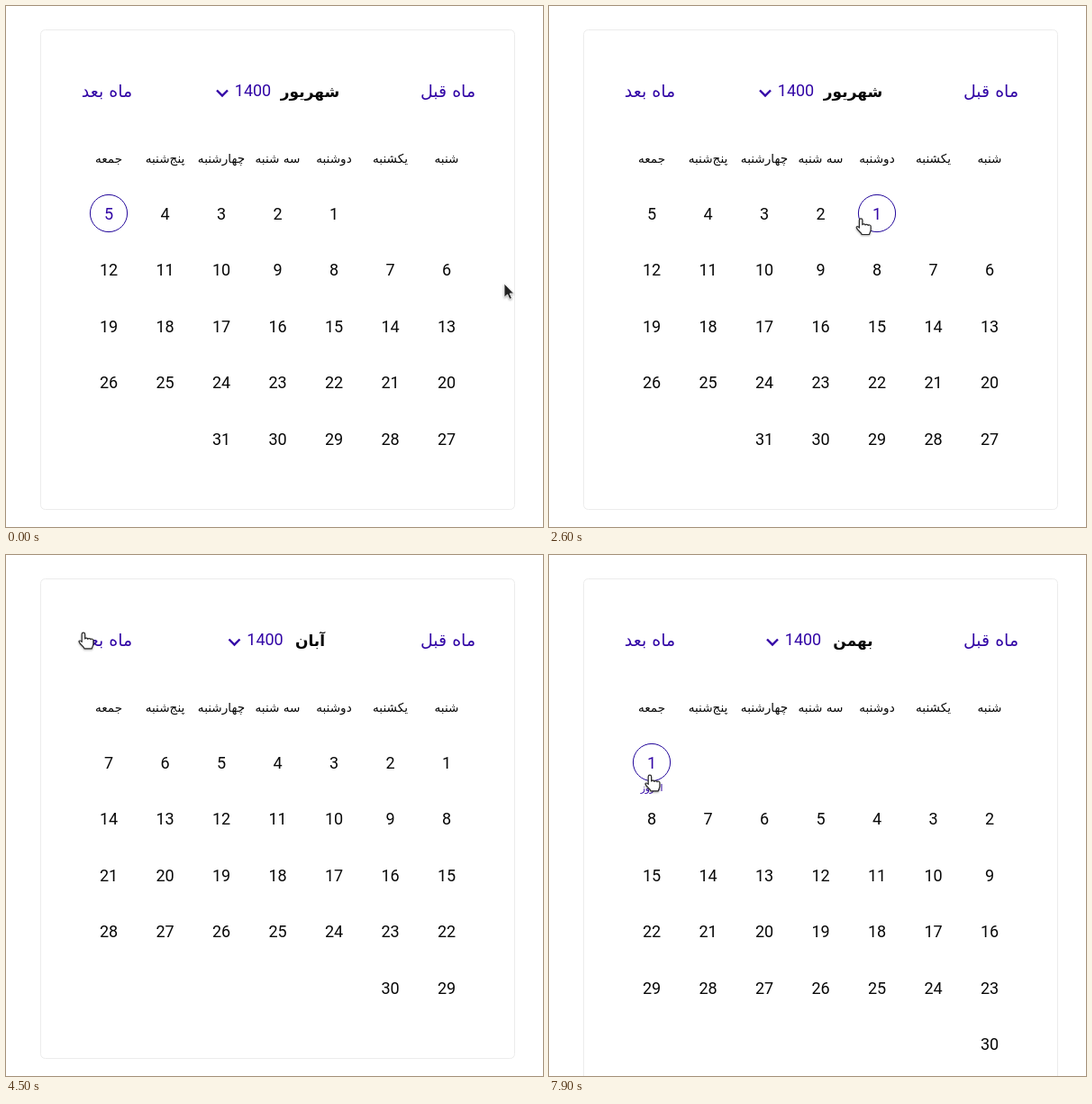
An HTML page for the animation above (8000 ms loop, 596 by 578 pixels).

```html
<!DOCTYPE html>
<html lang="fa">
<head>
<meta charset="utf-8">
<title>تقویم</title>
<style>
  html, body { margin: 0; width: 100%; height: 100%; overflow: hidden; background: #fff; }
  svg { display: block; width: 596px; height: 578px; }
  text { text-anchor: middle; fill: #080808; font: 18px Roboto, sans-serif; }
  .fa { font-family: "DejaVu Sans", sans-serif; direction: rtl; }
  .link { font-size: 19px; }
  .month { font-size: 17px; font-weight: bold; }
  .weekday { font-size: 13.6px; }
  .today { font-size: 10.6px; }
  .accent { fill: #3206a6; }
</style>
</head>
<body>
<svg viewBox="0 0 596 578">
  <rect id="card" x="38.5" y="26.5" width="526" rx="5" fill="#fff" stroke="#ececec"/>
  <text class="fa link accent" x="490.5" y="101">ماه قبل</text>
  <text class="fa link accent" x="112" y="101">ماه بعد</text>
  <text id="month" class="fa month" x="337.5" y="101"></text>
  <g id="year">
    <text class="accent" x="20" y="100">1400</text>
    <path d="M-20 93.5l6 6 6-6" fill="none" stroke="#3206a6" stroke-width="2.4"/>
  </g>
  <g id="weekdays"></g>
  <g id="days"></g>
  <g id="cursor" style="filter: drop-shadow(0 1px 1px #0005)">
    <path id="arrow" d="M0 0V15.2L3.6 12 6 17.3 8.4 16.2 6.1 11H10.6Z" fill="#222" stroke="#fff" stroke-width=".8"/>
    <path id="hand" d="M-1.8 9.5V.9a1.7 1.7 0 0 1 3.4 0V6c.3-1.1 3-1.1 3.2.3 .4-1 3-.9 3.2.4 .5-.9 2.9-.5 2.9.9V11.5c0 2.5-1.5 3.2-1.6 5.3H1C.5 14.5-3.8 12.5-4.9 9.3c-.5-1.7 1.6-1.9 3.1.2Z"
      fill="#fff" stroke="#2a2a2a" stroke-width="1.2" stroke-linejoin="round"/>
  </g>
</svg>
<script>
const LOOP = 8000, STEP = 100, PITCH = 62.5, FADE = 300;
const $ = id => document.getElementById(id);
const weekdays = ["شنبه", "یکشنبه", "دوشنبه", "سه شنبه", "چهارشنبه", "پنج\u200cشنبه", "جمعه"];

const months = [
  { at: 0, name: "شهریور", first: 2, length: 31, yearX: 254 },
  { at: 3800, name: "مهر", first: 5, length: 30, yearX: 267 },
  { at: 4300, name: "آبان", first: 0, length: 30, yearX: 267.5 },
  { at: 4900, name: "آذر", first: 2, length: 30, yearX: 272 },
  { at: 5400, name: "دی", first: 4, length: 30, yearX: 271.5 },
  { at: 5900, name: "بهمن", first: 6, length: 30, yearX: 262, today: 1 }
];

const picks = [
  { at: -1000, month: "شهریور", day: 5 },
  { at: 1625, month: "شهریور", day: 1 },
  { at: 2825, month: "شهریور", day: 2 },
  { at: 7525, month: "بهمن", day: 1 }
];

// Pointer stops: time, x, y
const stops = [
  [300, 553, 308], [1200, 364, 229], [1800, 364, 229], [2300, 361, 238],
  [2500, 361, 238], [2800, 304, 233], [2900, 302, 231], [3200, 201, 129],
  [3300, 201, 129], [3400, 60, 62], [3700, 86, 87], [6400, 86, 87],
  [7000, 94, 206], [7300, 106, 225], [7600, 112, 245]
];

const clamp = v => Math.max(0, Math.min(1, v));
const smooth = v => v * v * (3 - 2 * v);
const latest = (list, t) => list.filter(item => item.at <= t).pop();
const colX = col => 489 - PITCH * col;
const rowY = row => Math.floor(230 + PITCH * row);

function pointerAt(t) {
  const next = stops.findIndex(s => s[0] > t);
  if (next < 0) return stops[stops.length - 1].slice(1);
  if (next === 0) return stops[0].slice(1);
  const a = stops[next - 1], b = stops[next];
  const k = smooth((t - a[0]) / (b[0] - a[0]));
  return [a[1] + (b[1] - a[1]) * k, a[2] + (b[2] - a[2]) * k];
}

// Ring strength of a day: the newest pick fades in, the one before fades out
function ringOf(month, day, t) {
  const made = picks.filter(p => p.at <= t);
  const [before, now] = [made[made.length - 2], made[made.length - 1]];
  const k = clamp((t - now.at) / FADE);
  const matches = p => p && p.month === month.name && p.day === day;
  return { picked: matches(now), ring: matches(now) ? k : matches(before) ? 1 - k : 0 };
}

function render(t) {
  const month = latest(months, t);
  const [px, py] = pointerAt(t);
  const rows = Math.ceil((month.first + month.length) / 7);
  let overLink = px > 78 && px < 146 && py > 80 && py < 112;
  let html = "";

  for (let day = 1; day <= month.length; day++) {
    const slot = month.first + day - 1;
    const x = colX(slot % 7), y = rowY(Math.floor(slot / 7));
    const { picked, ring } = ringOf(month, day, t);
    const dx = px - x, dy = py - y;
    if (Math.abs(dx) < 31 && Math.abs(dy) < 31) overLink = true;
    if (Math.hypot(dx, dy) < 21) {
      html += `<circle cx="${x}" cy="${y}" r="21" fill="#f5f5f7" opacity="${picked ? 1 - ring : 1}"/>`;
    }
    if (ring > 0) {
      html += `<circle cx="${x}" cy="${y}" r="20.6" fill="none" stroke="#22069a" opacity="${ring}"/>`;
    }
    const tone = picked ? " accent" : "";
    html += `<text class="${tone}" x="${x}" y="${y + 7}">${day}</text>`;
    if (day === month.today) {
      html += `<text class="fa today${tone}" x="${x}" y="${y + 25 + 7 * ring}">امروز</text>`;
    }
  }

  $("days").innerHTML = html;
  $("card").setAttribute("height", 532 + PITCH * (rows - 5));
  $("month").textContent = month.name;
  $("year").setAttribute("transform", `translate(${month.yearX})`);
  $("cursor").setAttribute("transform", `translate(${px} ${py})`);
  $("arrow").style.display = overLink ? "none" : "";
  $("hand").style.display = overLink ? "" : "none";
}

$("weekdays").innerHTML = weekdays
  .map((name, col) => `<text class="fa weekday" x="${colX(col)}" y="174">${name}</text>`).join("");

const start = performance.now();
let shown = -1;
function tick() {
  const t = Math.floor((performance.now() - start) % LOOP / STEP) * STEP;
  if (t !== shown) render(shown = t);
  requestAnimationFrame(tick);
}
tick();
</script>
</body>
</html>
```
